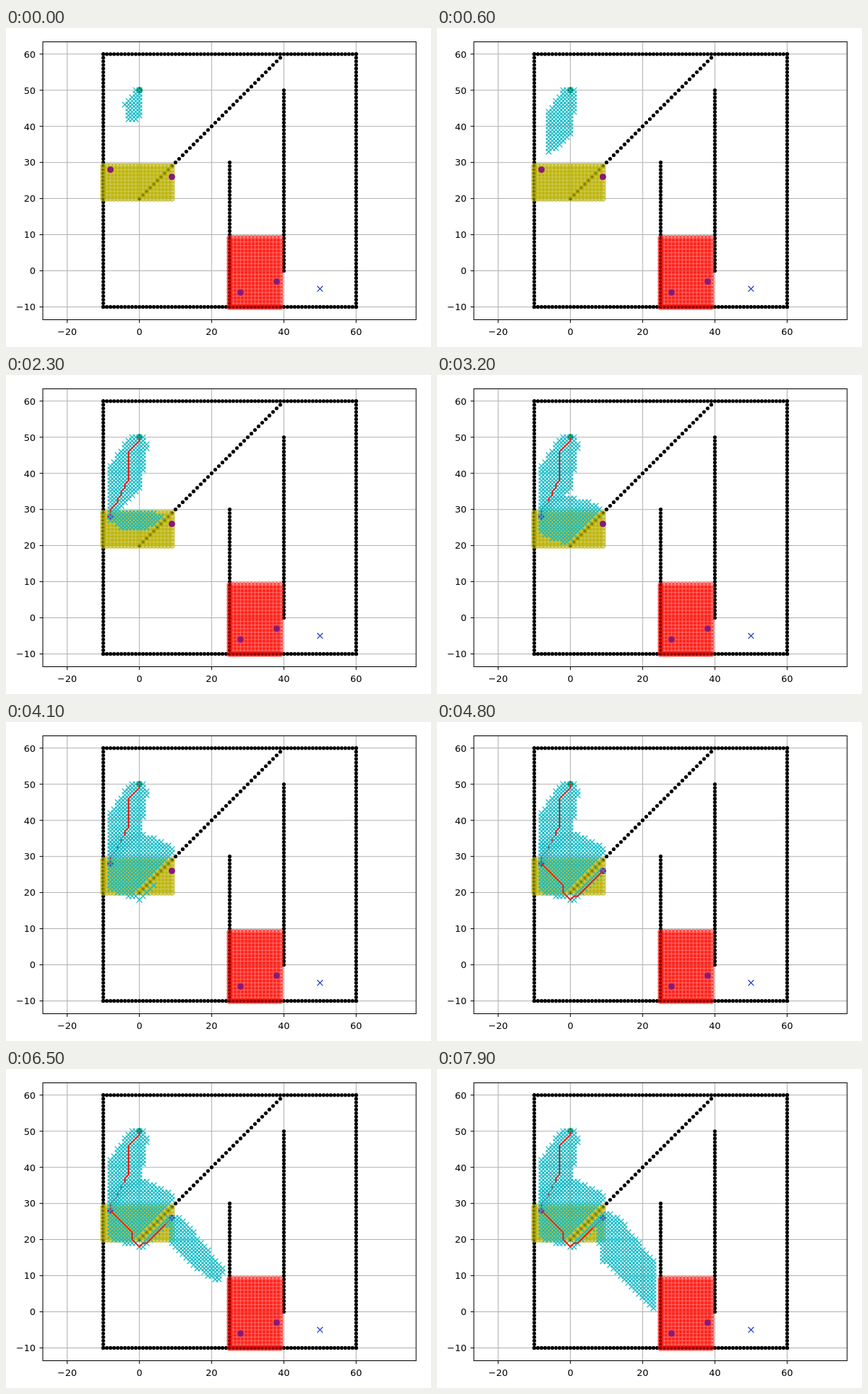
Animation, 600 px wide and 450 px high, one loop 8 s. Source, as an HTML page with a canvas:

```html
<!DOCTYPE html>
<html lang="en">
<head>
<meta charset="utf-8">
<title>Grid search with checkpoints</title>
<style>
  html, body { margin: 0; width: 100%; height: 100%; overflow: hidden; background: #fff; }
  canvas { display: block; }
</style>
</head>
<body>
<canvas id="stage" width="600" height="450"></canvas>
<script>
const LOOP = 8000, TICK = 100;
const PT = 1.302;                       // one typographic point in pixels
const px = x => 188.3 + 5.1 * x;
const py = y => 342.5 - 5.095 * y;
const range = (from, to) => Array.from({ length: to - from + 1 }, (_, i) => from + i);

// Walls
const walls = [
  ...range(-10, 60).flatMap(i => [[i, -10], [i, 60], [-10, i], [60, i]]),
  ...range(-10, 30).map(y => [25, y]),
  ...range(0, 50).map(y => [40, y]),
  ...range(0, 39).map(i => [i, 20 + i]),
];
const key = (x, y) => x + "," + y;
const blocked = new Set(walls.flatMap(([x, y]) =>
  [[0, 0], [1, 0], [-1, 0], [0, 1], [0, -1]].map(([dx, dy]) => key(x + dx, y + dy))));

const MOVES = [[1, 0], [0, 1], [-1, 0], [0, -1], [-1, -1], [-1, 1], [1, -1], [1, 1]]
  .map(([dx, dy]) => [dx, dy, Math.sqrt(dx * dx + dy * dy)]);

// A* on the grid; returns the nodes in the order they are expanded.
function search([sx, sy], [gx, gy], limit) {
  const open = new Map([[key(sx, sy), { x: sx, y: sy, cost: 0 }]]);
  const closed = new Set(), visited = [];
  const score = n => n.cost + Math.sqrt((n.x - gx) ** 2 + (n.y - gy) ** 2);
  while (open.size && visited.length < limit) {
    let bestKey, best, bestScore = Infinity;
    for (const [k, n] of open) {
      const s = score(n);
      if (s < bestScore) { bestScore = s; best = n; bestKey = k; }
    }
    visited.push([best.x, best.y]);
    if (best.x === gx && best.y === gy) break;
    open.delete(bestKey);
    closed.add(bestKey);
    for (const [dx, dy, step] of MOVES) {
      const n = { x: best.x + dx, y: best.y + dy, cost: best.cost + step };
      const k = key(n.x, n.y);
      if (blocked.has(k) || closed.has(k)) continue;
      if (!open.has(k) || open.get(k).cost > n.cost) open.set(k, n);
    }
  }
  return visited;
}

const START = [0, 50], GOAL = [50, -5];
const CHECKPOINTS = [[-8, 28], [9, 26], [28, -6], [38, -3]];

// Batch j of ten nodes appears at: begin + pace * j + slowing * j^2 / 2
const legs = [
  { begin: -240, pace: 78, slowing: 1, nodes: search(START, CHECKPOINTS[0], 1000),
    route: [[0, 50], [0, 49], [-3, 46], [-3, 38], [-4, 37], [-4, 36], [-5, 35], [-5, 34],
            [-6, 33], [-6, 32], [-8, 30], [-8, 28]] },
  { begin: 1720, pace: 73.7, slowing: 2.97, nodes: search(CHECKPOINTS[0], CHECKPOINTS[1], 1000),
    route: [[-8, 28], [-2, 22], [-2, 20], [0, 18], [1, 19], [2, 19], [9, 26]] },
  { begin: 5090, pace: 106.4, slowing: 1.3, nodes: search(CHECKPOINTS[1], CHECKPOINTS[2], 300),
    route: [] },
];

function shownNodes({ begin, pace, slowing }, time) {
  const elapsed = time - begin;
  if (elapsed < 0) return 0;
  const batch = Math.floor((Math.sqrt(pace * pace + 2 * slowing * elapsed) - pace) / slowing);
  return 10 * batch + 1;
}

function line(g, points) {
  g.beginPath();
  points.forEach(([x, y]) => g.lineTo(x, y));
  g.stroke();
}

function disc(g, [x, y], radius, edge = 0) {
  g.beginPath();
  g.arc(px(x), py(y), radius, 0, 2 * Math.PI);
  g.fill();
  if (edge) {
    g.lineWidth = edge;
    g.stroke();
  }
}

function cross(g, [x, y]) {
  const r = 3 * PT, cx = px(x), cy = py(y);
  g.lineWidth = PT;
  line(g, [[cx - r, cy - r], [cx + r, cy + r]]);
  line(g, [[cx - r, cy + r], [cx + r, cy - r]]);
}

function ink(g, color) {
  g.fillStyle = g.strokeStyle = color;
}

function area(g, xs, ys, color) {
  ink(g, color);
  for (const x of xs) for (const y of ys) disc(g, [x, y], 3 * PT, PT);
}

function drawChart(g) {
  const left = 52, right = 579, top = 19.5, bottom = 411.5;
  const xTicks = [-20, 0, 20, 40, 60], yTicks = range(-1, 6).map(i => 10 * i);
  const label = v => String(v).replace("-", "\u2212");
  ink(g, "#fff");
  g.fillRect(0, 0, 600, 450);

  g.lineWidth = 0.8 * PT;
  ink(g, "#b0b0b0");
  xTicks.forEach(v => line(g, [[px(v), top], [px(v), bottom]]));
  yTicks.forEach(v => line(g, [[left, py(v)], [right, py(v)]]));

  ink(g, "#000");
  g.font = "13px 'DejaVu Sans', sans-serif";
  g.textAlign = "center";
  for (const v of xTicks) {
    line(g, [[px(v), bottom], [px(v), bottom + 4.6]]);
    g.fillText(label(v), px(v), 433);
  }
  g.textAlign = "right";
  for (const v of yTicks) {
    line(g, [[left - 4.6, py(v)], [left, py(v)]]);
    g.fillText(label(v), 41.8, py(v) + 4.8);
  }

  walls.forEach(p => disc(g, p, 2 * PT));
  area(g, range(-10, 9), range(20, 29), "rgba(186,178,0,0.5)");
  area(g, range(25, 39), range(-10, 9), "rgba(255,10,0,0.43)");

  g.lineWidth = 0.8 * PT;
  ink(g, "#000");
  g.strokeRect(left, top, right - left, bottom - top);

  ink(g, "#087a35");
  disc(g, START, 3 * PT, PT);
  ink(g, "#1f3fd0");
  cross(g, GOAL);
  ink(g, "#8a1a78");
  CHECKPOINTS.forEach(p => disc(g, p, 3 * PT, PT));
}

const stage = document.getElementById("stage").getContext("2d");
const chart = document.createElement("canvas");
chart.width = 600;
chart.height = 450;
drawChart(chart.getContext("2d"));

function draw(time) {
  stage.drawImage(chart, 0, 0);
  for (const leg of legs) {
    const count = shownNodes(leg, time);
    ink(stage, "#14bcc8");
    leg.nodes.slice(0, count).forEach(p => cross(stage, p));
    if (count >= leg.nodes.length) {
      ink(stage, "#f01c10");
      stage.lineWidth = 1.5 * PT;
      stage.lineJoin = "round";
      line(stage, leg.route.map(([x, y]) => [px(x), py(y)]));
    }
  }
}

function frame() {
  draw(Math.floor((performance.now() % LOOP) / TICK) * TICK);
  requestAnimationFrame(frame);
}
frame();
</script>
</body>
</html>
```
